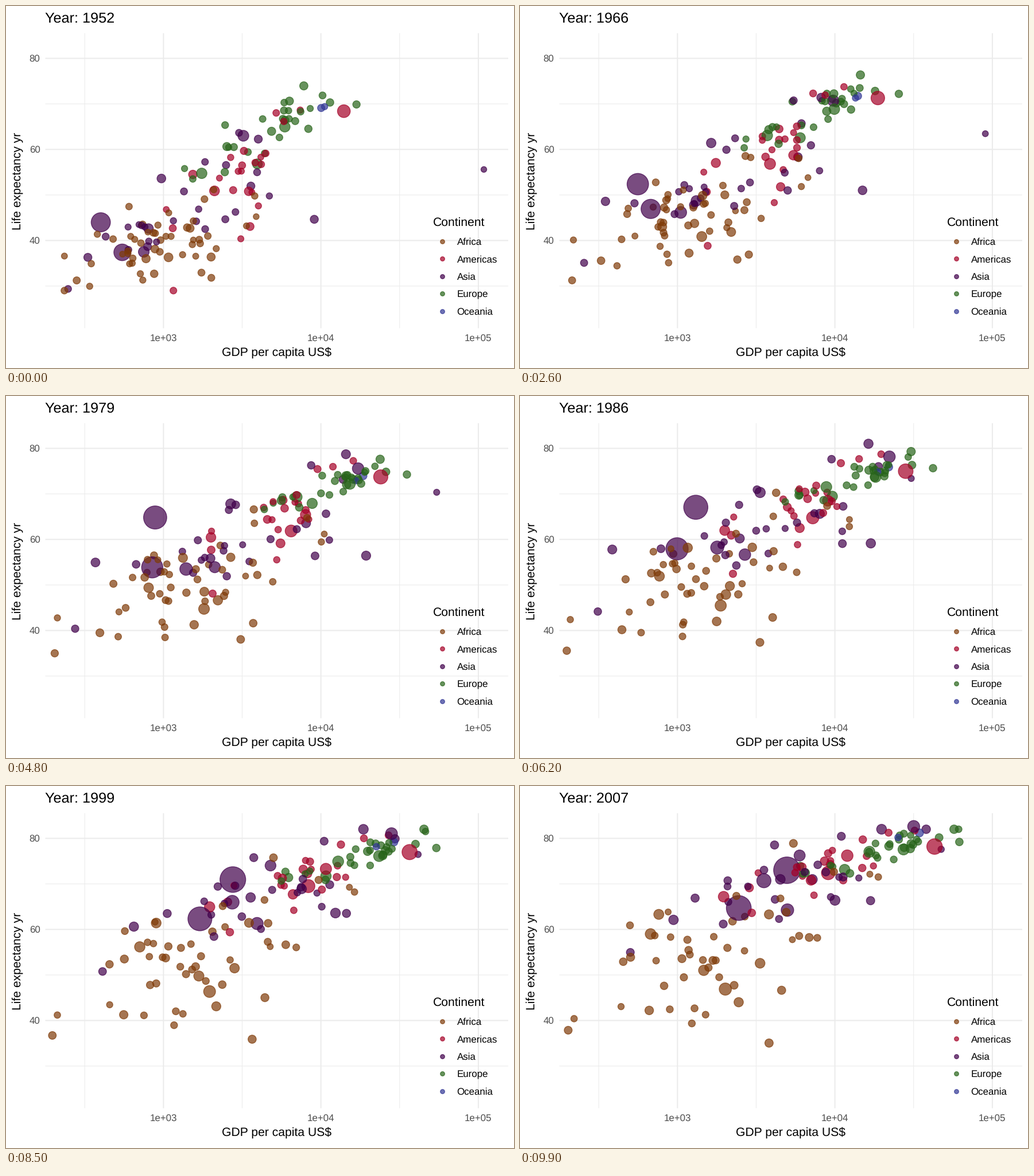
These frames come from a looping animation (885x632 px, 10000 ms). A matplotlib script:

```python
import numpy as np
import matplotlib.pyplot as plt
from matplotlib.animation import FuncAnimation

W, H, FRAMES = 885, 632, 100
FIRST, LAST = 1952, 2007
PT = 0.72  # points per pixel at 100 dpi
ALPHA = 0.7
STROKE = 1.36
COLORS = {"Africa": "#7F3B08", "Americas": "#A50026", "Asia": "#40004B",
          "Europe": "#276419", "Oceania": "#313695"}

plt.rcParams.update({"font.family": "Liberation Sans", "text.hinting": "none"})
rng = np.random.default_rng(12)
u = np.arange(FRAMES) / (FRAMES - 1)
moving = []  # (draw rank, x, y, radius, color)


def to_x(log_gdp):
    return 274.3 + 274.3 * (log_gdp - 3)


def to_y(life):
    return 409.4 - 7.95 * (life - 40)


def through(*values):
    """Straight legs through values evenly spaced over the loop."""
    return np.interp(u, np.linspace(0, 1, len(values)), values)


def add(rank, continent, log_gdp, life, people):
    moving.append((rank, to_x(log_gdp), to_y(life),
                   4.77 + 0.507 * np.sqrt(people), COLORS[continent]))


def lead(rank, continent, people, *way):
    """A dot with its own path of (gdp, life) points; people in millions."""
    add(rank, continent, through(*np.log10(way[::2])), through(*way[1::2]), through(*people))


def normals(n):
    """Seeded normal scores with mean 0 and spread 1."""
    z = rng.standard_normal(n)
    return np.clip((z - z.mean()) / z.std(), -2.1, 2.1)


def crowd(continent, n, gdp, gdp_sd, life, life_sd, tie, people, growth, turn=0.7):
    """Dots drifting inside a cloud whose centre and spread follow key values.

    tie is the correlation of wealth and life; turn shuffles places over time.
    """
    rich, rich_later, well, well_later, big = (normals(n) for _ in range(5))
    cos, sin = np.cos(turn * u), np.sin(turn * u)
    for k in range(n):
        a = rich[k] * cos + rich_later[k] * sin
        b = well[k] * cos + well_later[k] * sin
        b = tie * a + np.sqrt(1 - tie ** 2) * b
        start = people * np.exp(big[k])
        add(rng.random(), continent,
            through(*gdp) + through(*gdp_sd) * a,
            np.clip(through(*life) + through(*life_sd) * b, 29, 82),
            through(start, start * growth))


crowd("Africa", 51, (2.98, 3.16, 3.24), (0.29, 0.37, 0.42),
      (39.2, 50.5, 54.8), (5, 6.8, 9.2), 0.4, 3, 3.3)
crowd("Americas", 22, (3.48, 3.74, 3.91), (0.22, 0.22, 0.26),
      (53.5, 65.5, 73.5), (8.8, 5.8, 3.8), 0.65, 3.3, 2.9)
crowd("Asia", 27, (3.16, 3.56, 3.75), (0.38, 0.54, 0.56),
      (46.5, 60.5, 70.5), (8, 8.5, 7), 0.65, 6, 3)
crowd("Europe", 30, (3.68, 4.11, 4.33), (0.26, 0.22, 0.27),
      (64.4, 72.3, 77.6), (5.8, 2.6, 2.8), 0.85, 9, 1.25)

# The few dots that stand out, by size or by place
lead(0.04, "Oceania", (9, 20), 10040, 69.1, 18900, 74.1, 34435, 81.2)
lead(0.10, "Americas", (57, 190), 2109, 50.9, 6700, 62.2, 9066, 72.4)
lead(0.17, "Asia", (556, 1318), 400, 44, 505, 47.3, 703, 63.5,
     1212, 66.6, 2163, 70.1, 4959, 73)
lead(0.41, "Asia", (372, 1110), 547, 37.4, 716, 49.5, 1040, 59.1, 2452, 64.7)
lead(0.42, "Asia", (82, 223), 750, 37.5, 1420, 54, 3541, 70.7)
lead(0.48, "Asia", (86, 127), 3217, 63, 13135, 72.8, 23860, 78.9, 31656, 82.6)
lead(0.52, "Asia", (0.2, 2.5), 108382, 55.6, 92500, 61.2, 85500, 68.4,
     29400, 73, 39200, 76, 47307, 77.6)
lead(0.60, "Americas", (30, 109), 3478, 50.8, 8200, 65.9, 11978, 76.2)
lead(0.65, "Asia", (20, 48), 331, 36.3, 354, 51.9, 390, 58.6, 944, 62.1)
lead(0.69, "Oceania", (2, 4), 10557, 69.4, 16900, 73, 25185, 80.2)
lead(0.71, "Africa", (33, 135), 1077, 36.3, 1840, 45, 2014, 46.9)
lead(0.97, "Americas", (157, 301), 13990, 68.4, 24400, 73.9, 42952, 78.2)

moving.sort(key=lambda dot: dot[0])
_, xs, ys, radii, colors = zip(*moving)
xs, ys, radii = np.array(xs), np.array(ys), np.array(radii)

fig = plt.figure(figsize=(W / 100, H / 100), dpi=100, facecolor="white")
ax = fig.add_axes([0, 0, 1, 1])
ax.set(xlim=(0, W), ylim=(H, 0))
ax.axis("off")


def line(x, y, width):
    ax.plot(x, y, color="#EBEBEB", lw=width * PT, solid_capstyle="butt",
            snap=False, zorder=1)


def label(x, y, text, size, color="black", **kw):
    return ax.text(x, y, text, fontsize=size * PT, color=color, va="baseline", zorder=5, **kw)


def marker_size(radius):
    return (2 * radius * PT) ** 2


def dots(x, y, radius, color, zorder):
    return ax.scatter(x, y, s=marker_size(radius), c=color, alpha=ALPHA,
                      linewidths=STROKE * PT, zorder=zorder)


left, right, top, bottom = 68.5, 875, 47.5, 562.5
for life in range(30, 90, 10):
    line([left, right], [to_y(life)] * 2, 1.02 if life % 20 else 2.05)
    if life % 20 == 0:
        label(59.5, to_y(life) + 6, str(life), 16.9, "#4D4D4D", ha="right")
for half in range(5, 11):
    x = to_x(half / 2)
    line([x, x], [top, bottom], 1.02 if half % 2 else 2.05)
    if half % 2 == 0:
        label(x, 585.5, f"1e+0{half // 2}", 16.9, "#4D4D4D", ha="center")

label(471.5, 610.5, "GDP per capita US$", 21.1, ha="center")
label(26, 306, "Life expectancy yr", 21.1, ha="center",
      rotation=90, rotation_mode="anchor")
label(744, 383.5, "Continent", 21.1)
for k, (name, color) in enumerate(COLORS.items()):
    y = 411.1 + 30.35 * k
    dots([760], [y], 3.75, [color], 4)
    label(785.6, y + 6.2, name, 16.9)

title = label(68.5, 29, "", 25.3)
cloud = dots(xs[:, 0], ys[:, 0], radii[:, 0], colors, 3)


def update(i):
    title.set_text(f"Year: {round(FIRST + (LAST - FIRST) * u[i])}")
    cloud.set_offsets(np.column_stack([xs[:, i], ys[:, i]]))
    cloud.set_sizes(marker_size(radii[:, i]))
    return title, cloud


anim = FuncAnimation(fig, update, frames=FRAMES, interval=100, repeat=True)
plt.show()
```
